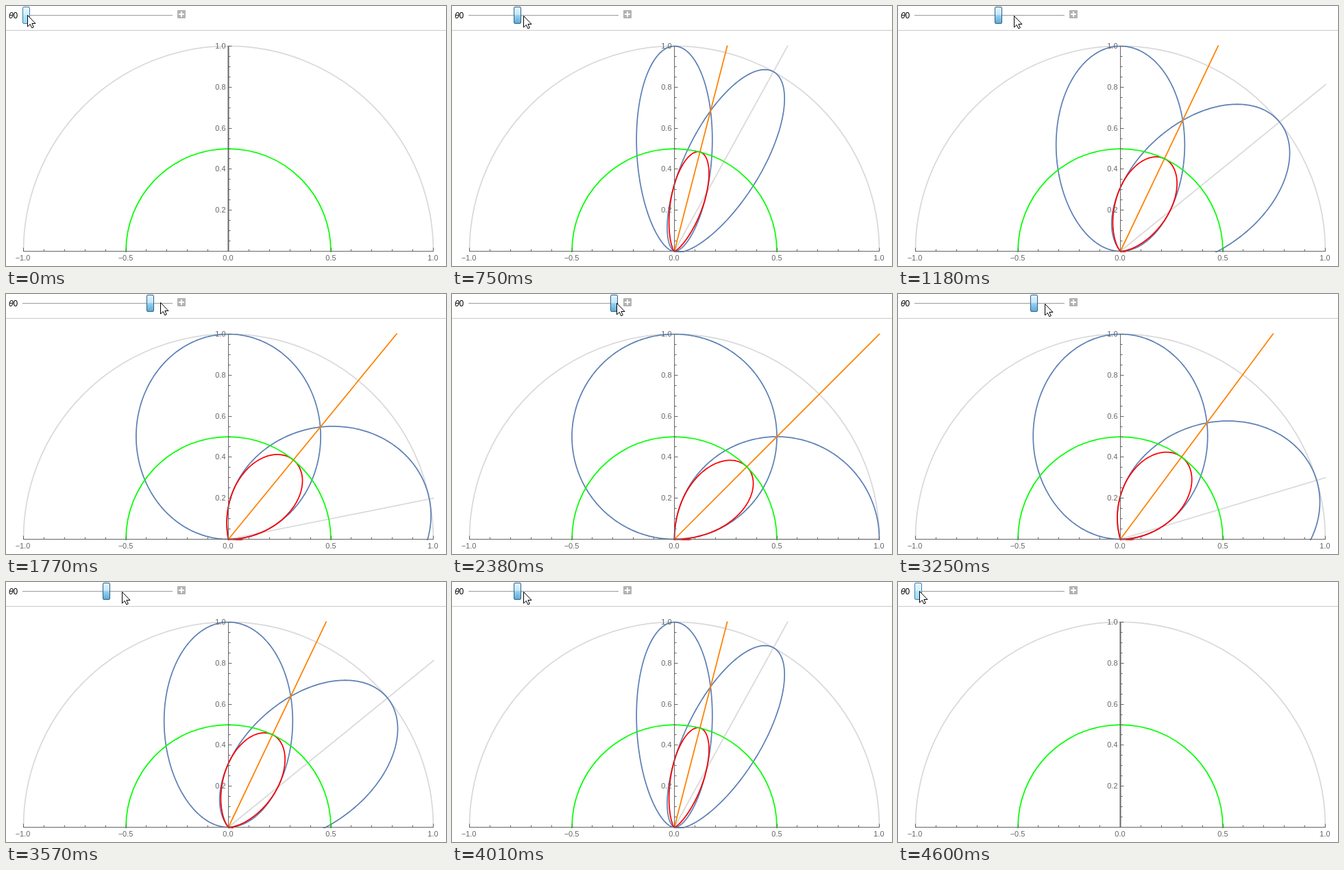
An HTML page that plays this animation: 642 px wide and 379 px high, repeating every 4.89 s.

```html
<!DOCTYPE html>
<html lang="en">
<head>
<meta charset="utf-8">
<title>Polar lobes</title>
<style>
  html, body { margin: 0; width: 100%; height: 100%; overflow: hidden; background: #fff; }
  svg { display: block; width: 642px; height: 379px; }
  .plot { fill: none; stroke-width: 1.75; }
  .faint { stroke: #d9d9d9; }
  .lobe { stroke: #5e81b5; }
  .axes { fill: none; stroke: #666; stroke-width: 1; }
  .labels { font: 11px "Liberation Sans", Arial, sans-serif; fill: #666; }
  .name { font: 12px "Liberation Sans", Arial, sans-serif; fill: #000; }
</style>
</head>
<body>
<svg viewBox="0 0 642 379">
  <defs>
    <clipPath id="frame"><rect x="24" y="57.5" width="600.5" height="301.5"/></clipPath>
    <linearGradient id="hover" x2="0" y2="1">
      <stop offset="0" stop-color="#eaf6fd"/><stop offset=".5" stop-color="#d3eefc"/>
      <stop offset=".5" stop-color="#b6e6fd"/><stop offset="1" stop-color="#a0dcf8"/>
    </linearGradient>
    <linearGradient id="pressed" x2="0" y2="1">
      <stop offset="0" stop-color="#e5f4fc"/><stop offset=".5" stop-color="#c4e5f6"/>
      <stop offset=".5" stop-color="#98d1ef"/><stop offset="1" stop-color="#5ea9d6"/>
    </linearGradient>
  </defs>

  <text class="name" x="4" y="18"><tspan font-style="italic">θ</tspan>0</text>
  <path d="M24 13.5H243" stroke="#a8a8a8"/>
  <path d="M24 14.5H243" stroke="#e6e6e6"/>
  <rect x="250" y="6" width="12" height="12" rx="1" fill="#b3b3b3"/>
  <path d="M252 12h8M256 8v8" stroke="#fff" stroke-width="2"/>
  <path d="M0 35.5H642" stroke="#ccc"/>

  <g class="plot" clip-path="url(#frame)">
    <path class="faint" d="M25.5 357.5a299 299 0 0 1 598 0"/>
    <path class="faint" id="ray"/>
    <path class="lobe" id="fixed"/>
    <path class="lobe" id="turned"/>
    <path stroke="#ff8000" id="middle"/>
    <path stroke="#f00" id="product"/>
    <path stroke="#0f0" d="M175 359V357.5a149.5 149.5 0 0 1 299 0V359"/>
  </g>
  <path class="axes" id="axes"/>
  <path id="flat" d="M324.5 58V358" stroke="#666" stroke-width="2"/>
  <g class="labels" id="labels"></g>

  <rect id="thumb" x="-5" y="1.5" width="10" height="24" rx="1.5"/>
  <path id="cursor" d="M0 0V16.5L3.8 13L6.3 18.4L8.8 17.3L6.4 12H11.5Z" fill="#fff" stroke="#000"/>
</svg>
<script>
const CX = 324.5, CY = 357.5, R = 299, LOOP = 4890, RAD = Math.PI / 180;

// Hand-dragged slider: step starts (ms), angle (degrees), pointer x
const starts = [0, 290, 440, 590, 750, 880, 1020, 1180, 1320, 1480, 1630, 1770, 1930, 2080, 2220, 2380];
const angles = [0, 5, 13, 21.5, 28.9, 33.5, 39.3, 50.95, 60, 67, 73.3, 78.7, 83, 86.5, 89, 90];
const pointer = [32, 45, 65, 88, 105, 116, 133, 170, 188, 204, 215, 226, 232, 237, 240, 241];

const $ = id => document.getElementById(id);
const path = (id, d) => $(id).setAttribute('d', d);
const point = (a, r) =>
  (CX + R * r * Math.sin(a)).toFixed(2) + ' ' + (CY - R * r * Math.cos(a)).toFixed(2);
const ray = a => `M${CX} ${CY}L${point(a, 1.5)}`;

function polar(r) {
  const pts = [];
  for (let d = -90; d <= 90; d += 0.5) pts.push(point(d * RAD, r(d * RAD)));
  return 'M' + pts.join('L');
}

function drawAxes() {
  let d = `M25 ${CY}H624M${CX} 58V358`, text = '';
  const label = (x, y, anchor, v) => {
    text += `<text x="${x}" y="${y}" text-anchor="${anchor}">${v.toFixed(1).replace('-', '−')}</text>`;
  };
  for (let i = -10; i <= 10; i++) {
    const x = Math.round(CX + i * R / 10 - 0.5) + 0.5, major = i % 5 === 0;
    d += `M${x} ${CY}v${major ? -5 : -3}`;
    if (major) label(x - (i < 0 ? 1 : 0.5), 371, 'middle', i / 10);
  }
  for (let i = 1; i <= 20; i++) {
    const y = Math.round(CY - i * R / 20 - 0.5) + 0.5, major = i % 4 === 0;
    d += `M${CX} ${y}h${major ? 5 : 3}`;
    if (major) label(320.5, y + 3.5, 'end', i / 20);
  }
  path('axes', d);
  $('labels').innerHTML = text;
}

function draw(step) {
  const a = angles[step] * RAD, half = Math.cos(a / 2);
  const open = step > 0;
  for (const id of ['ray', 'fixed', 'turned', 'middle', 'product'])
    $(id).style.display = open ? '' : 'none';
  $('flat').style.display = open ? 'none' : '';
  if (open) {
    // Each lobe falls to 1/√2 on the bisector
    const k = (Math.sqrt(half * Math.SQRT2) - 1) / (1 - half * half);
    const lobe = t => Math.cos(t) / (1 + k * Math.sin(t) ** 2) ** 2;
    path('ray', ray(a));
    path('middle', ray(a / 2));
    path('fixed', polar(lobe));
    path('turned', polar(t => lobe(t - a)));
    path('product', polar(t => lobe(t) * lobe(t - a)));
  }
  const thumb = $('thumb');
  thumb.setAttribute('transform', `translate(${Math.round(29 + angles[step] * 2.3) + 0.5})`);
  thumb.setAttribute('fill', open ? 'url(#pressed)' : 'url(#hover)');
  thumb.setAttribute('stroke', open ? '#2c628b' : '#3c7fb1');
  $('cursor').setAttribute('transform', `translate(${pointer[step] - 0.5} ${step === 11 ? 12.5 : step && step < 11 ? 14.5 : 13.5})`);
}

let shown = -1;
function tick() {
  const t = performance.now() % LOOP;
  const m = t < LOOP / 2 ? t : LOOP - t - 0.01;
  const step = starts.filter(s => s <= m).length - 1;
  if (step !== shown) draw(shown = Math.max(step, 0));
  requestAnimationFrame(tick);
}
drawAxes();
tick();
</script>
</body>
</html>
```
